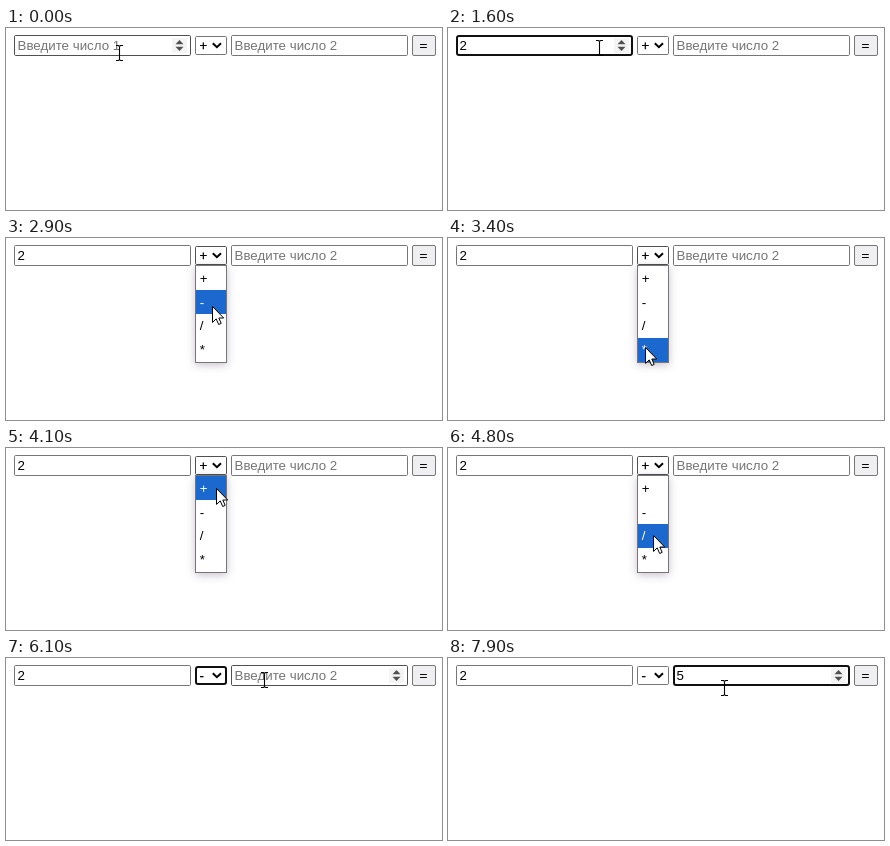
Write an HTML page that moves like this. It is 436 px wide and 182 px high and loops after 8 s.

```html
<!DOCTYPE html>
<html lang="ru">
<head>
<meta charset="utf-8">
<title>Калькулятор</title>
<style>
  html, body { margin: 0; width: 100%; height: 100%; overflow: hidden; background: #fff; }
  svg { display: block; width: 436px; height: 182px; }
  text { font: 13.333px "Liberation Sans", Arial, sans-serif; fill: #000; white-space: pre; }
  .hint { fill: #757575; }
  .sign { stroke: #000; stroke-width: .3; }
  .box { fill: #fff; stroke: #767676; }
  .box.hover { stroke: #505050; }
  .box.focus { stroke: #101010; stroke-width: 2; }
  .popup { filter: drop-shadow(0 2px 4px rgba(50, 30, 70, .28)); }
</style>
</head>
<body>
<svg viewBox="0 0 436 182">
  <defs>
    <g id="spinner">
      <rect width="15" height="15" fill="#f4f4f4"/>
      <path d="M3.5 6.2 7.5 2 11.5 6.2ZM3.5 8.8 7.5 13 11.5 8.8Z" fill="#505050"/>
    </g>
  </defs>
  <g id="fields"></g>
  <rect id="select" class="box"/>
  <text id="operator" class="sign" x="193.5" y="22"></text>
  <path d="M206.8 15.3 210.9 19.2 215 15.3" fill="none" stroke="#000" stroke-width="2"/>
  <rect x="406.5" y="7.5" width="23" height="20" rx="1.5" fill="#efeef0" stroke="#767676"/>
  <text class="sign" x="417.5" y="22" text-anchor="middle">=</text>
  <g id="popup">
    <rect class="popup" x="189.5" y="27.5" width="31" height="97" fill="#fff" stroke="#767676"/>
    <rect id="mark" x="190" width="30" height="24" fill="#1b68ce"/>
    <g id="options"></g>
  </g>
  <path id="arrow" d="M.5.5V16.4L4.2 12.9 6.7 18.5 9.2 17.4 6.8 12H11.7Z" fill="#fff" stroke="#000"/>
  <path id="beam" d="M-3.5-7.5H-1.2L0-6.7 1.2-7.5H3.5M0-7V7M-3.5 7.5H-1.2L0 6.7 1.2 7.5H3.5" fill="none" stroke="#000" stroke-width="1.1"/>
</svg>
<script>
const LOOP = 8000, STEP = 100, BLINK = 500, ROW_TOP = 28, ROW = 24;
const OPEN = 2400, PICK = 5700;
const OPTIONS = ['+', '-', '/', '*'];
const $ = id => document.getElementById(id);

// The pointer eases to each point between the given times.
const START = { x: 113, y: 25 };
const moves = [
  { from: 1500, to: 1600, x: 151, y: 20 },
  { from: 1600, to: 1900, x: 226, y: 3 },
  { from: 1900, to: 2200, x: 218, y: 16 },
  { from: 2600, to: 3400, x: 197, y: 109 },
  { from: 3600, to: 4100, x: 210, y: 40 },
  { from: 4400, to: 4800, x: 205, y: 87 },
  { from: 5100, to: 5400, x: 211, y: 63 },
  { from: PICK, to: 6100, x: 258, y: 22 },
  { from: 7600, to: 7900, x: 276, y: 30 }
];

const fields = [
  { x: 8, hint: 'Введите число 1', value: '2', focus: 200, typed: 1000, blur: OPEN },
  { x: 225, hint: 'Введите число 2', value: '5', focus: 6300, typed: 7200, blur: LOOP }
];

const show = (el, on) => el.setAttribute('visibility', on ? 'visible' : 'hidden');

function set(el, attrs) {
  for (const key in attrs) el.setAttribute(key, attrs[key]);
  return el;
}

function add(parent, tag, attrs) {
  const el = document.createElementNS('http://www.w3.org/2000/svg', tag);
  return parent.appendChild(set(el, attrs));
}

// Outer bounds stay the same for the thin border and the focus ring.
function outline(el, x, y, w, h, focus, hover) {
  const line = focus ? 2 : 1;
  set(el, { x: x + line / 2, y: y + line / 2, width: w - line, height: h - line, rx: focus ? 2 : 1.2,
    class: 'box' + (focus ? ' focus' : hover ? ' hover' : '') });
}

for (const f of fields) {
  f.box = add($('fields'), 'rect', {});
  f.text = add($('fields'), 'text', { x: f.x + 3.5, y: 22 });
  f.spinner = add($('fields'), 'use', { href: '#spinner', x: f.x + 158, y: 10 });
  f.caret = add($('fields'), 'rect', { y: 10, width: 1, height: 15 });
}
const labels = OPTIONS.map((op, i) => {
  const label = add($('options'), 'text', { x: 193.7, y: ROW_TOP + 17 + (ROW - .4) * i });
  label.textContent = op;
  return label;
});

function pointerAt(t) {
  const now = Math.floor(t / STEP) * STEP;
  let { x, y } = START;
  for (const m of moves) {
    const part = Math.max(0, Math.min(1, (now - m.from) / (m.to - m.from)));
    const eased = Math.sin(part * Math.PI / 2);
    x += (m.x - x) * eased;
    y += (m.y - y) * eased;
  }
  return [Math.round(x), Math.round(y)];
}

function drawField(f, t, px, py) {
  const focus = t >= f.focus && t < f.blur, typed = t >= f.typed;
  const hover = px >= f.x && px < f.x + 177 && py >= 7 && py < 28;
  const blinks = Math.floor((t - (typed ? f.typed : f.focus)) / BLINK);
  outline(f.box, f.x, 7, 177, 21, focus, hover);
  f.text.textContent = typed ? f.value : f.hint;
  f.text.setAttribute('class', typed ? '' : 'hint');
  f.caret.setAttribute('x', f.x + (typed ? 11 : 4));
  show(f.caret, focus && blinks % 2 === 0);
  show(f.spinner, focus || hover);
}

function draw(t) {
  const [px, py] = pointerAt(t);
  const open = t >= OPEN && t < PICK;
  for (const f of fields) drawField(f, t, px, py);

  const picked = t >= PICK;
  outline($('select'), 189, 8, 32, 19, picked && t < fields[1].focus, open && py >= ROW_TOP);
  $('operator').textContent = OPTIONS[picked ? 1 : 0];

  const row = Math.max(0, Math.min(3, Math.floor((py - ROW_TOP) / ROW)));
  $('popup').style.display = open ? '' : 'none';
  $('mark').setAttribute('y', ROW_TOP + ROW * row);
  labels.forEach((label, i) => label.style.fill = i === row ? '#fff' : '#000');

  const beam = !open && (px < 189 || px >= 225) && py >= 7 && py <= 30;
  show($('beam'), beam);
  show($('arrow'), !beam);
  $(beam ? 'beam' : 'arrow').setAttribute('transform', `translate(${px + (beam ? .5 : 0)} ${py})`);
}

const began = performance.now();
function tick() {
  draw((performance.now() - began) % LOOP);
  requestAnimationFrame(tick);
}
tick();
</script>
</body>
</html>
```
